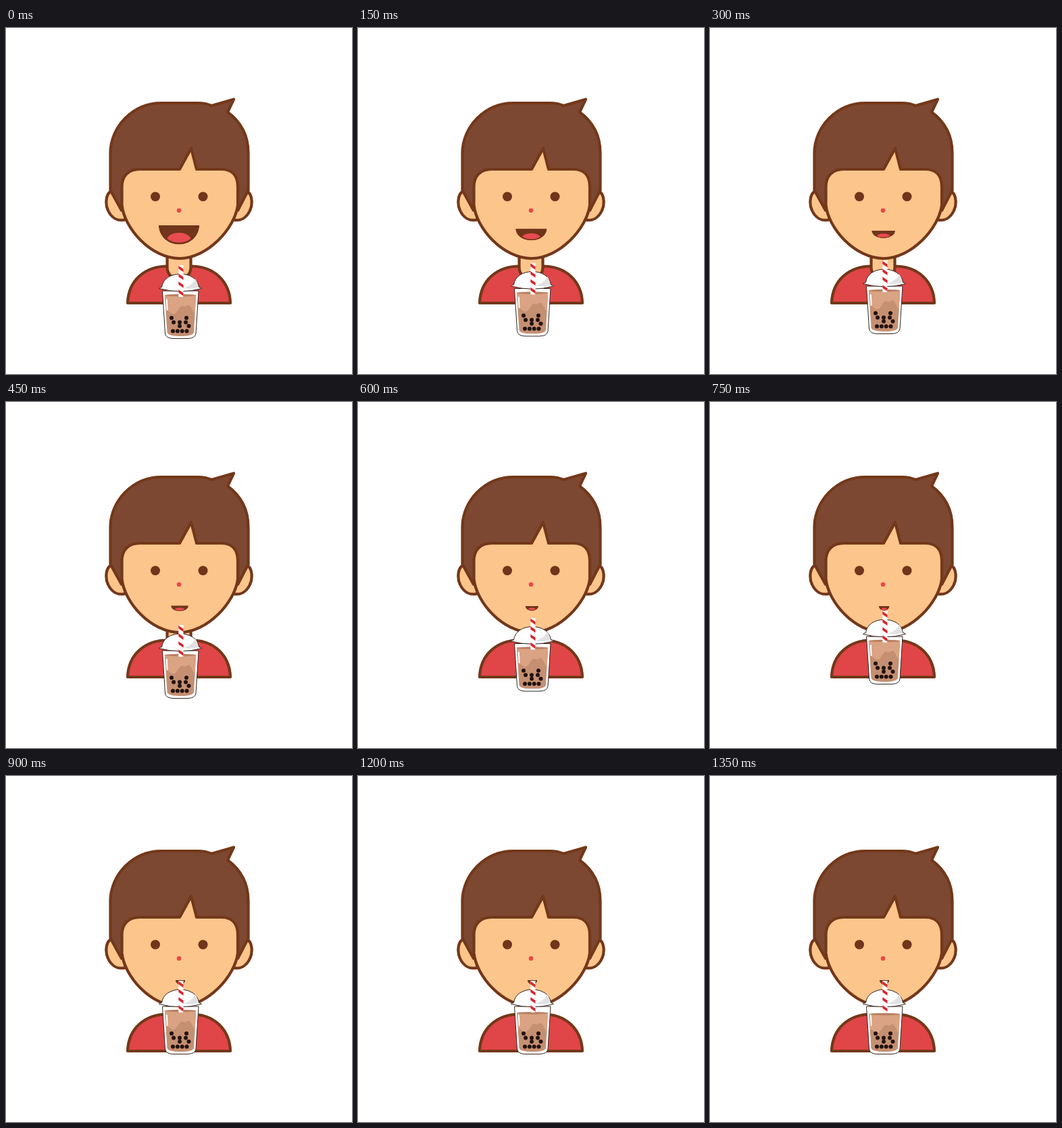
An HTML page that plays this animation: 512 by 512 pixels, repeating every 1.5 s.

```html
<!DOCTYPE html>
<html lang="en">
<head>
<meta charset="utf-8">
<title>Bubble tea</title>
<style>
  html, body { margin: 0; width: 100%; height: 100%; overflow: hidden; background: #fff; }
  svg { display: block; width: 100vw; height: 100vh; }
  .line { stroke: #73381a; stroke-width: 4.2; stroke-linejoin: round; stroke-linecap: round; }
  .skin { fill: #fcc58b; }
  .dark { fill: #70351a; }
  .ink { stroke: #33241d; stroke-width: 1; stroke-linejoin: round; }
</style>
</head>
<body>
<svg viewBox="0 0 512 512">
  <defs>
    <path id="smile" d="M-30 0H30C29 17 16 28 0 28S-29 17 -30 0Z"/>
    <clipPath id="lips"><use href="#smile"/></clipPath>
    <clipPath id="inside"><path d="M234.5 390H281.5L278 450Q277 456 258 456T238.5 450Z"/></clipPath>
    <clipPath id="tube"><rect x="255.300" y="351" width="7.200" height="46"/></clipPath>
  </defs>

  <path class="line" fill="#e04547" d="M180 407C181 373 206 352.500 239 352.500H274C308 352.500 331 375 332 407Z"/>
  <path class="line skin" d="M238.500 334V354C238.500 377 273.500 377 273.500 354V334Z"/>

  <path id="ear" class="line skin" d="M155 242C147 246 147 262 151 270C156 281 165 286 176 284L180 250Z"/>
  <use href="#ear" transform="matrix(-1 0 0 1 512 0)"/>
  <path class="line" fill="#7d4831" d="M154.500 240V185C154.500 147 187 111 230 111H284Q296 111 304 115L337 105.500L328 124.500C349 140 358.500 160 358.500 185V240L343 270H171Z"/>
  <path class="line skin" d="M171.500 235C171.500 218 182 209 198 209H257L274 178L282 209H318C334 209 343 218 343 235V262C339 296 298 341 257 341C214 341 175 296 171.500 262Z"/>
  <circle class="dark" cx="221" cy="249.500" r="7"/>
  <circle class="dark" cx="291.500" cy="249.500" r="7"/>
  <circle cx="256" cy="270" r="3.300" fill="#e6484a"/>

  <g id="mouth">
    <use class="dark" href="#smile"/>
    <g clip-path="url(#lips)">
      <ellipse cy="22" rx="18" ry="11" fill="#e84b50"/>
      <use href="#smile" fill="none" stroke="#70351a" stroke-width="5"/>
    </g>
  </g>

  <g id="cup">
    <path class="ink" fill="#fff" d="M231.500 389H285L281 452Q280 459.500 268 459.500H248Q236.500 459.500 235.500 452Z"/>
    <g clip-path="url(#inside)">
      <g id="tea">
        <rect x="230" y="395" width="56" height="80" fill="#c58f72"/>
        <path fill="#d9a384" d="M230 395H286V425C279 428 277 419 274 414C270 406 267 414 263 412C257 408 255 420 249 423C243 425 243 416 230 417Z"/>
        <ellipse cx="258" cy="395.500" rx="23" ry="1.800" fill="#b98062"/>
      </g>
    </g>
    <g id="pearls" fill="#21130f"></g>
    <path d="M237.800 402L238.600 417" stroke="#fff" stroke-width="2" stroke-linecap="round"/>
    <path class="ink" fill="#fff" d="M226.500 385.500Q227 384 230.500 383.500C232 371 244 364 258 364S284 371 285.500 383.500Q289 384 289.500 385.500Q258 394 226.500 385.500Z"/>
    <path fill="#e2e2e2" d="M263 385Q277 380 280 371Q284 377 284.500 384Q275 387 263 385Z"/>
    <ellipse cx="258.800" cy="396.500" rx="3.600" ry="1.600" fill="#fff"/>
    <g clip-path="url(#tube)">
      <rect x="255" y="351" width="8" height="46" fill="#fff"/>
      <path id="stripes" fill="#dc2228"/>
    </g>
  </g>
</svg>
<script>
  const STEP = 150, STEPS = 10, SIP_START = 6;
  const el = id => document.getElementById(id);
  const mix = (a, b, k) => a + (b - a) * k;
  const move = (id, x, y, scale = "") =>
    el(id).setAttribute("transform", `translate(${x} ${y}) ${scale}`);

  // The cup starts slowly, rises steadily and settles at the lips.
  const rise = [[0, 0], [2, 7], [3, 21], [5, 42], [SIP_START, 48]];

  function along(keys, at) {
    const next = keys.findIndex(key => key[0] >= at);
    if (next < 1) return keys[0][1];
    const [[t0, v0], [t1, v1]] = keys.slice(next - 1, next + 1);
    return mix(v0, v1, (at - t0) / (t1 - t0));
  }

  // Each row spreads its pearls evenly between two ends.
  const pearlRow = (y, count, from, to) =>
    Array.from({ length: count }, (_, i) =>
      `<circle cx="${mix(from, to, i / (count - 1))}" cy="${y}" r="3"/>`).join("");

  el("pearls").innerHTML = pearlRow(429, 2, 245, 267) + pearlRow(435.5, 3, 248, 266)
    + pearlRow(441, 2, 257, 270.5) + pearlRow(448.5, 4, 247, 267.5);
  el("stripes").setAttribute("d", Array.from({ length: 4 }, (_, i) =>
    `M255 ${351.5 + i * 11.8}l8 5.500v4.500l-8-5.500z`).join(""));

  function draw(time) {
    const step = Math.floor(time / STEP) % STEPS;
    const reach = Math.min(step, SIP_START);
    const sip = (step - reach) / (STEPS - 1 - SIP_START);
    const progress = reach / SIP_START;
    const width = mix(7, 30, (1 - progress) ** 2) / 30;
    const open = (1 - progress) ** 4;

    move("cup", 0, -along(rise, reach));
    move("tea", 0, 5 * sip);
    move("mouth", 256 + 2 * progress, mix(302, 292, open),
      `scale(${width} ${mix(6.5, 28, open) / 28})`);
  }

  const start = performance.now();
  function tick() {
    draw(performance.now() - start);
    requestAnimationFrame(tick);
  }
  tick();
</script>
</body>
</html>
```
